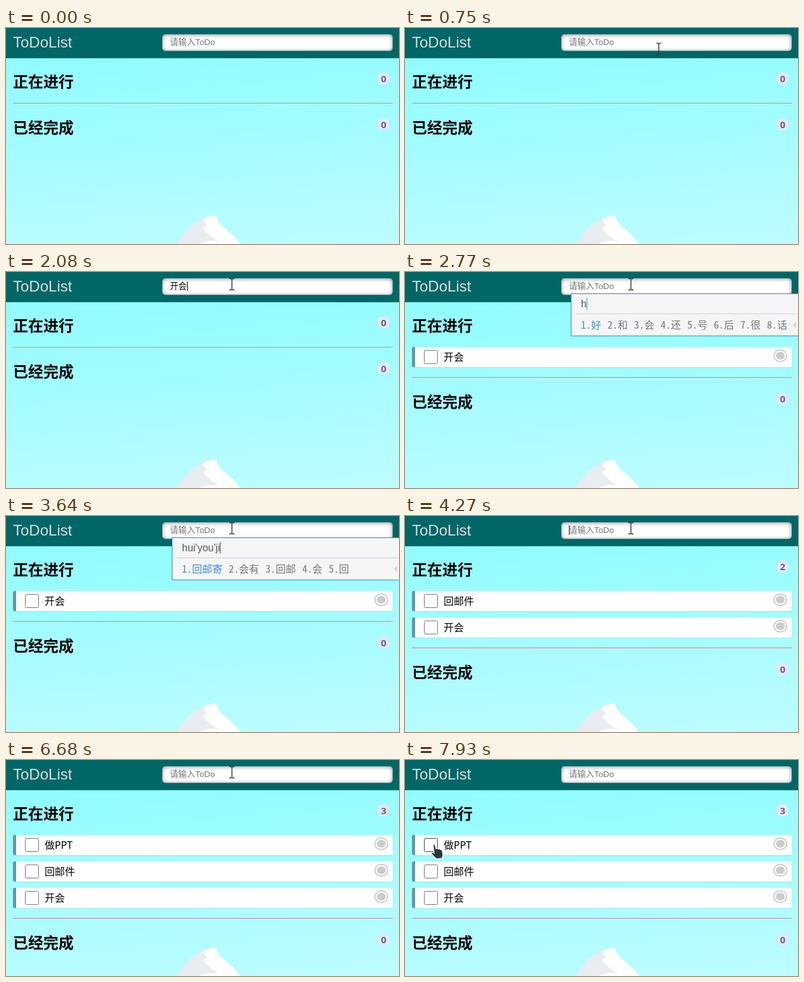
Write an HTML page that moves like this. It is 621x343 px and loops after 8000 ms.

```html
<!DOCTYPE html>
<html lang="zh-CN">
<head>
<meta charset="utf-8">
<title>ToDoList</title>
<style>
html, body { margin: 0; width: 100%; height: 100%; overflow: hidden; }
body {
  position: relative; color: #000;
  font: 16px "Noto Sans", "Noto Sans CJK SC", "Noto Sans CJK", sans-serif;
  background: linear-gradient(176deg, #90fcff 14%, #bdfcff);
}
body *, .abs { box-sizing: border-box; }
.abs, header, h1, h2, hr, li, li *, .badge, #ime * { position: absolute; margin: 0; white-space: pre; }
header { left: 0; top: 0; width: 621px; height: 48px; background: #066; }
h1, #field, #typed { font-family: "Liberation Sans", "Noto Sans CJK SC", "Noto Sans CJK", sans-serif; }
h1 { left: 11px; top: 0; font-size: 24px; font-weight: 400; line-height: 46px; color: #ddd; }
#field {
  left: 247px; top: 10px; width: 364px; height: 26px; padding-left: 12px;
  font-size: 13.333px; line-height: 26px; border-radius: 5px; background: #fff;
  box-shadow: 0 1px 0 rgba(255,255,255,.24), inset 0 1px 6px rgba(0,0,0,.45);
}
#caret { display: inline-block; width: 1px; height: 15px; margin-right: -1px; background: #000; vertical-align: -3px; }
#hint { color: #757575; }
h2 { left: 11px; top: 68px; font: bold 24px/31px "Noto Sans CJK SC", "Noto Sans CJK", sans-serif; }
.badge {
  right: 15px; top: 70px; height: 20px; padding: 0 5px; border-radius: 20px; background: #e6e6fa;
  color: #666; font-weight: bold; font-size: 15px; line-height: 21px;
}
section { position: absolute; left: 0; top: 0; width: 621px; }
hr { left: 11px; top: 119px; width: 600px; height: 2px; border: solid; border-width: 1px 0; border-color: #969696 transparent #e6eeee; }
ul { margin: 0; padding: 0; list-style: none; }
li {
  left: 11px; width: 600px; height: 32px; line-height: 32px; padding-left: 45px; background: #fff;
  border-left: 5px solid #629a9c; border-radius: 3px; box-shadow: 0 1px 2px rgba(0,0,0,.07);
}
li b { left: 14px; top: 5px; width: 22px; height: 22px; border: 1px solid #767676; border-radius: 2.5px; }
li i { right: 5px; top: 2px; width: 26px; height: 24px; border: 6px double #fff; border-radius: 14px; background: #ccc; }
#ime {
  left: 262px; top: 34px; width: 370px; height: 68px; overflow: hidden;
  background: #f5f5f5; border: 1px solid #2d8cf0;
}
#typed { left: 15px; top: 6px; line-height: 22px; color: #555; border-right: 1px solid #555; height: 19px; line-height: 20px; }
#typed.first { border-color: #2d8cf0; }
#rule { left: 7px; top: 31px; width: 363px; height: 1px; background: #ccd0dc; }
#words { left: 15px; top: 37px; font: 300 16px/22px "Noto Sans Mono CJK SC", "Noto Sans CJK SC", "Noto Sans CJK", monospace; color: #777; }
#words span { position: static; margin-right: 10px; }
#words span:first-child { color: #3a8ee6; }
#more { left: 350px; top: 44px; border: 5px solid transparent; border-left: 0; border-right-color: #d4d4d4; }
svg { position: absolute; left: 0; top: 0; }
</style>
</head>
<body>
<svg width="621" height="343">
  <path fill="#e8edf1" d="M269 343Q276 332 286 321Q296 310 308 304Q320 298 332 298L336 308L370 343Z"/>
  <path fill="#fff" d="M317 301Q324 298 332 298Q334 308 343 316Q360 328 370 343H306Q320 336 337 339Q323 333 311 318Q319 314 316 310Q308 307 317 301Z"/>
</svg>
<header>
  <h1>ToDoList</h1>
  <div id="field" class="abs"><span id="value"></span><span id="caret"></span><span id="hint">请输入ToDo</span></div>
</header>
<h2>正在进行</h2><span class="badge" id="count">0</span>
<ul id="list"></ul>
<section id="done"><hr><div class="abs" style="top:73px;width:621px"><h2>已经完成</h2><span class="badge">0</span></div></section>
<div id="ime" class="abs"><span id="typed"></span><div id="rule"></div><div id="words"></div><div id="more"></div></div>
<svg width="621" height="343"><g id="cursor">
  <path id="beam" fill="none" stroke="#333" stroke-width="1.4" d="M-4 -9H-1.5L0 -8L1.5 -9H4M0 -8V8M-4 9H-1.5L0 8L1.5 9H4"/>
  <path id="arrow" fill="#fff" stroke="#222" d="M0 0V16L4 12.5L6.500 18.500L9 17.500L6.500 11.500H11.500Z"/>
  <path id="hand" fill="#263a3a" stroke="#fff" stroke-width="1.2" d="M-1.500 1Q0 -1.500 1.500 1L3 7Q5 5.500 6.500 7.500Q9 6 10 8.500Q12.500 8 13 11L14 16Q14 19 12 22L4 23Q0 20 -4 15Q-5 12 -2 13L0 14Z"/>
</g></svg>
<script>
const LOOP = 8000;
const $ = id => document.getElementById(id);

// [time, typed letters, candidates]; empty letters close the popup
const composing = [
  [0, ''],
  [1370, 'k', '看 可 卡 快 块 开 口 靠'],
  [1450, 'ka', '卡 咔 咯 咖 喀 佧 鉲 胩'],
  [1530, 'kai', '开 凯 慨 楷 揩 恺 铠 锴'],
  [1610, 'kai\'h', '开会 开花 开好 开 凯 慨'],
  [1690, 'kai\'hu', '开会 开户 开花 开 凯 慨'],
  [1830, 'kai\'hui', '开会 开 凯 慨 楷 揩 恺'],
  [2010, ''],
  [2770, 'h', '好 和 会 还 号 后 很 话'],
  [2850, 'hu', '胡 湖 户 虎 互 呼 护 乎'],
  [2930, 'hui', '会 回 灰 挥 惠 汇 辉 毁'],
  [3080, 'hui\'y', '会有 会议 回忆 会 回 灰'],
  [3240, 'hui\'yo', '会有 回邮 会用 会 回 灰'],
  [3400, 'hui\'you', '会有 回邮 会 回 灰 挥'],
  [3560, 'hui\'you\'j', '回邮件 会有 回邮 会 回'],
  [3640, 'hui\'you\'ji', '回邮寄 会有 回邮 会 回'],
  [3720, 'hui\'you\'jian', '回邮件 会有 回邮 会 回'],
  [4040, ''],
  [4810, 'z', '在 这 中 做 再 只 怎 着'],
  [4890, 'zu', '组 足 族 租 祖 阻 卒 诅'],
  [4970, 'zuo', '做 作 坐 左 座 昨 佐 琢'],
  [5360, '']
];
const values = [
  [0, ''], [2010, '开会'], [2230, ''], [4040, '回邮件'], [4270, ''],
  [5360, '做'], [5660, '做P'], [5830, '做PP'], [6000, '做PPT'], [6680, '']
];
const todos = [[2230, '开会'], [4270, '回邮件'], [6680, '做PPT']];
const caretOn = [[770, 1300], [1830, 2540], [3080, 3640], [4040, 4580], [5110, 6530], [7080, 7600]];

const latest = (steps, t) => steps.filter(s => s[0] <= t).pop();

function glide(t, start, end, count, from, to) {
  const n = Math.min(count, Math.floor((t - start) / (end - start) * count + 1e-6));
  const u = n / count, k = u * u * (3 - 2 * u);
  return from.map((a, i) => a + (to[i] - a) * k);
}

function drawCursor(t) {
  const [x, y] = t < 7080
    ? glide(t, 290, 850, 7, [579, 88], [357, 19.5])
    : glide(t, 6986, 7930, 10, [357, 19.5], [46, 134]);
  const inField = x > 247 && x < 611 && y > 10 && y < 36;
  const onBox = x > 30 && x < 52 && y > 124 && y < 146;
  const shape = inField ? 'beam' : onBox ? 'hand' : 'arrow';
  for (const id of ['beam', 'arrow', 'hand']) $(id).style.display = id === shape ? '' : 'none';
  $('cursor').style.display = t < 290 ? 'none' : '';
  $('cursor').setAttribute('transform', `translate(${x.toFixed(1)} ${y.toFixed(1)})`);
  return onBox;
}

function draw(t) {
  const hover = drawCursor(t);

  const value = latest(values, t)[1];
  $('value').textContent = value;
  $('hint').style.display = value ? 'none' : '';
  $('caret').style.visibility = caretOn.some(([a, b]) => t >= a && t < b) ? 'visible' : 'hidden';

  const [, letters, words = ''] = latest(composing, t);
  $('ime').style.display = letters ? '' : 'none';
  $('typed').textContent = letters;
  $('typed').className = letters.length === 1 ? 'first' : '';
  $('words').innerHTML = words.split(' ').map((w, i) => `<span>${i + 1}.${w}</span>`).join('');

  const shown = todos.filter(d => d[0] <= t).reverse();
  $('count').textContent = shown.length;
  $('list').innerHTML = shown.map(([, text], i) =>
    `<li style="top:${119 + 42 * i}px"><b${hover && !i ? ' style="border-color:#444"' : ''}></b>${text}<i></i></li>`).join('');
  $('done').style.top = (shown.length ? 6 + 42 * shown.length : 0) + 'px';
}

const begin = performance.now();
function tick() {
  draw((performance.now() - begin) % LOOP);
  requestAnimationFrame(tick);
}
tick();
</script>
</body>
</html>
```
